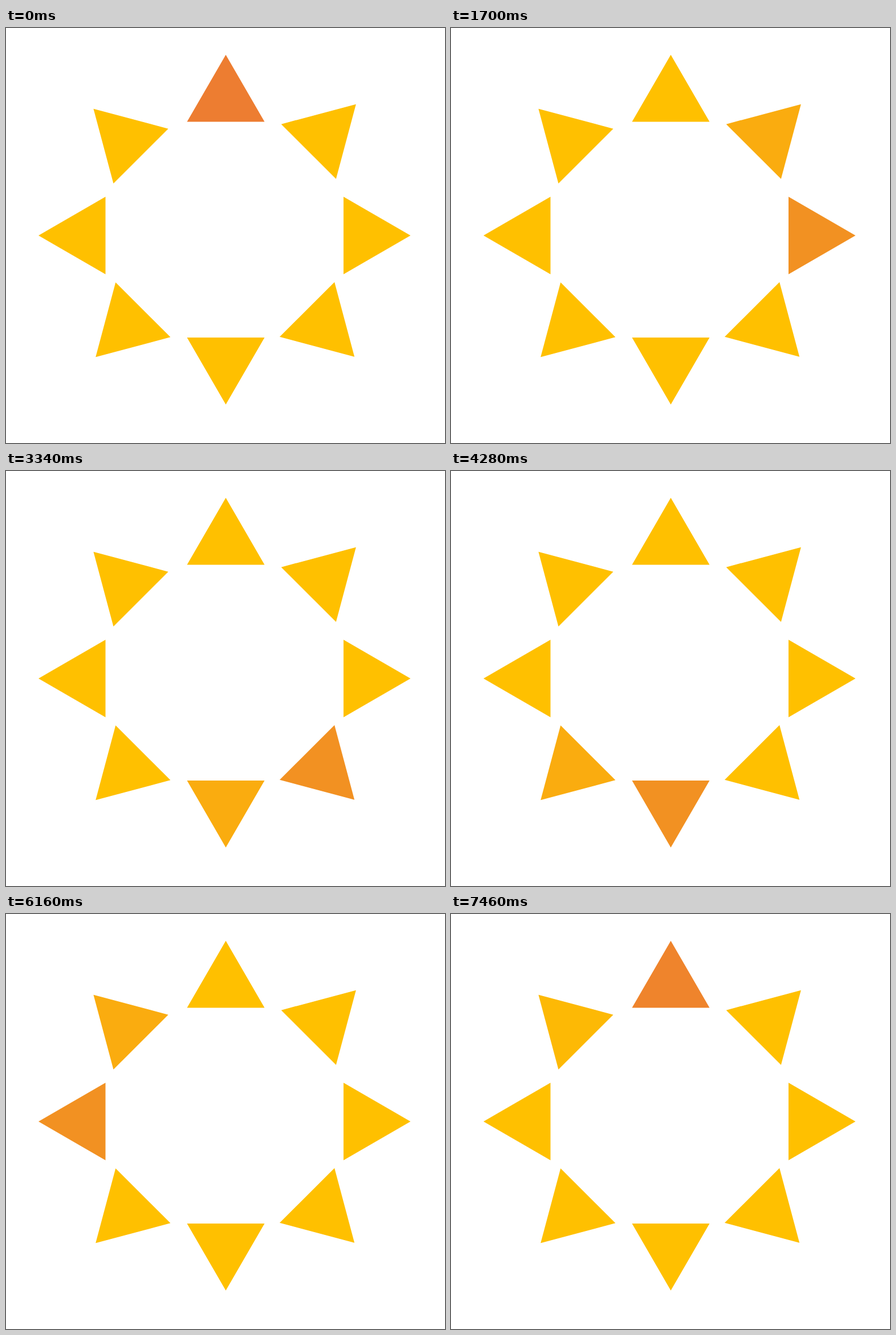
Recreate the animation shown at these times as an HTML page. Size 770x728 px, loop 7.52 s.

```html
<!DOCTYPE html>
<html lang="en">
<head>
<meta charset="utf-8">
<title>Ring of triangles</title>
<style>
  html, body { margin: 0; height: 100%; overflow: hidden; background: #fff; }
  svg { display: block; width: 100%; height: 100%; }
</style>
</head>
<body>
<svg viewBox="0 0 770 728"></svg>
<script>
const YELLOW = [255, 192, 0], ORANGE = [237, 125, 49];
const TURN = 940, HOLD = 520, STEP = 60;

// Triangle centres, clockwise from the top; each is turned 45° further.
const centres = [
  [385.5, 125.2], [558.5, 189], [631.2, 364], [555.8, 521.5],
  [385.5, 582.2], [212.6, 522], [135.3, 364], [208.8, 197]
];

const svg = document.querySelector('svg');
const triangles = centres.map(([x, y], i) => {
  const triangle = document.createElementNS(svg.namespaceURI, 'path');
  triangle.setAttribute('d', 'M0-78.3L68 39.2H-68Z');
  triangle.setAttribute('transform', `translate(${x} ${y}) rotate(${i * 45})`);
  return svg.appendChild(triangle);
});

const mix = amount =>
  `rgb(${YELLOW.map((c, i) => Math.round(c + (ORANGE[i] - c) * amount))})`;

function draw(now) {
  const time = now % (TURN * triangles.length);
  const active = Math.floor(time / TURN);
  const next = (active + 1) % triangles.length;
  const fading = time % TURN - HOLD;
  // The fade begins with a jump to 30 %, then advances 10 % per step.
  const fade = fading < 0 ? 0 : (3 + Math.floor(fading / STEP)) / 10;

  triangles.forEach((triangle, i) => {
    const amount = i === active ? 1 - fade : i === next ? fade : 0;
    triangle.setAttribute('fill', mix(amount));
  });
}

function loop() {
  draw(performance.now());
  requestAnimationFrame(loop);
}
loop();
</script>
</body>
</html>
```
